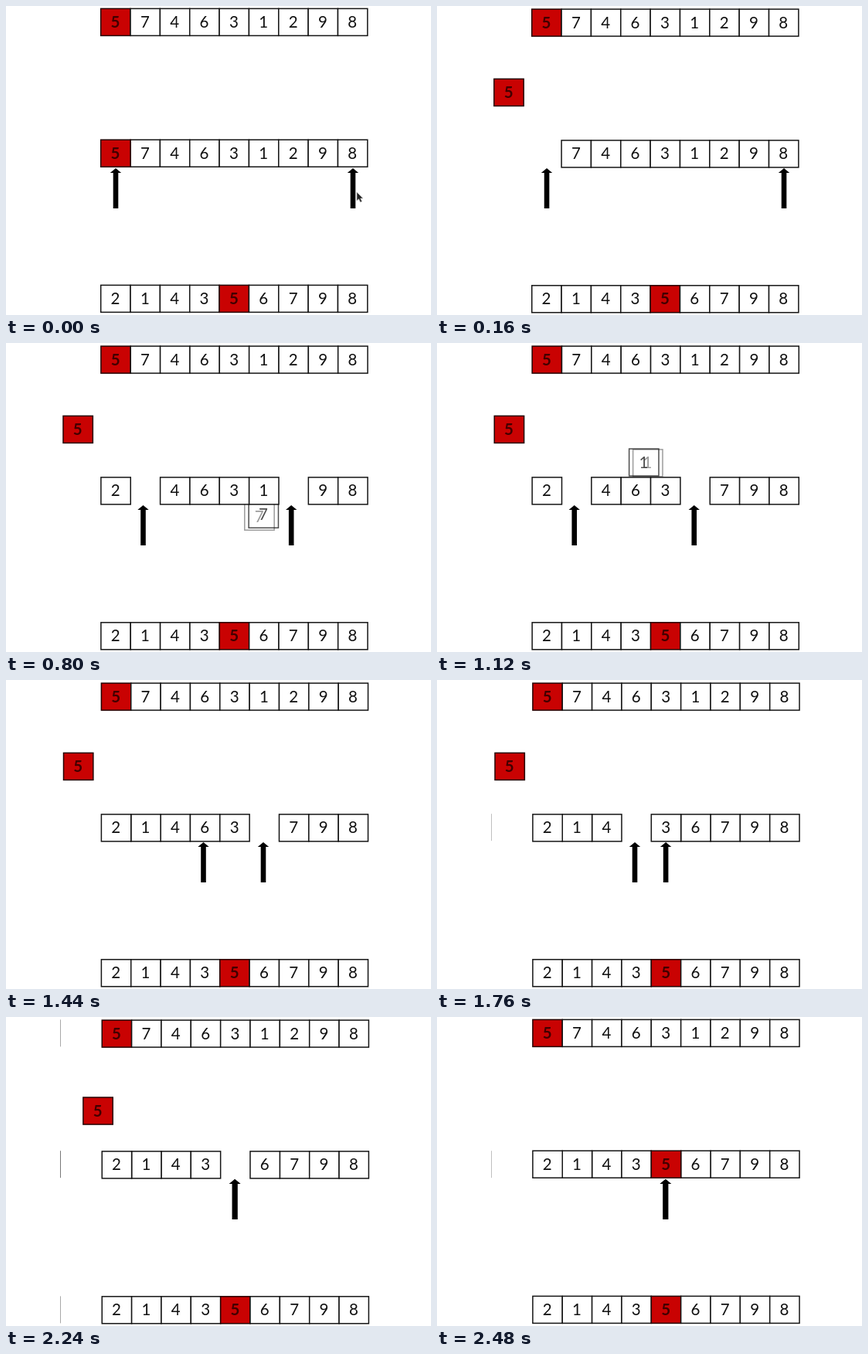
Recreate the animation shown at these times as an HTML page. Size 550x400 px, loop 2560 ms.

```html
<!DOCTYPE html>
<html lang="en">
<head>
<meta charset="utf-8">
<title>Partition around a pivot</title>
<style>
html, body { margin: 0; width: 100%; height: 100%; overflow: hidden; background: #fff; }
svg { display: block; width: 550px; height: 400px; }
text { font: 20.5px Lato, Carlito, sans-serif; text-anchor: middle; fill: #111; }
.pivot text { font-weight: 700; fill: #420000; }
rect { fill: #fff; stroke: #141414; stroke-width: 1.5; }
.pivot rect { fill: #c90202; stroke: #240000; }
.ghost rect { fill: none; }
</style>
</head>
<body>
<svg id="stage" viewBox="0 0 550 400"></svg>
<script>
const LOOP = 2560, STEP = 80;
const X0 = 122.7, W = 38.35, H = 35;
const TOP = 3.4, MID = 173.2, LOW = 361.4;
const PIVOT = 5, HOME = { x: 73.8, y: 94.4 }, PIVOT_END = 4;
const START = [5, 7, 4, 6, 3, 1, 2, 9, 8];
const SORTED = [2, 1, 4, 3, 5, 6, 7, 9, 8];

// All times below are counted in steps.
const moves = [
  { n: 2, from: 6, to: 0, t: 4, end: 5.62 },
  { n: 7, from: 1, to: 6, t: 8.6, end: 10.57 },
  { n: 1, from: 5, to: 1, t: 13, end: 15.2 },
  { n: 6, from: 3, to: 5, t: 18.3, end: 20.6 },
  { n: 3, from: 4, to: 3, t: 22.4, end: 24.6 }
];
const leftArrow = [[6, 142], [8, 177.3], [15.5, 177.3], [16.5, 216], [17, 216],
                   [18, 254.8], [26.2, 254.8], [27.6, 294.3]];
const rightArrow = [[2, 449], [3, 409], [4, 369], [11, 369], [12.5, 332.3],
                    [20.6, 332.3], [22, 294.9]];
const drift = [[0, 0], [10, 0.2], [18, 0.7], [22, 1.2], [26, 1.8], [31, 1.2]];

const stage = document.getElementById("stage");
const clamp = v => Math.max(0, Math.min(1, v));
const lerp = (a, b, p) => a + (b - a) * p;
const smooth = u => u * u * (3 - 2 * u);
const colX = c => X0 + c * W;

function track(keys, t) {
  if (t <= keys[0][0]) return keys[0][1];
  for (let i = 1; i < keys.length; i++) {
    const [a, v] = keys[i - 1], [b, w] = keys[i];
    if (t < b) return lerp(v, w, (t - a) / (b - a));
  }
  return keys[keys.length - 1][1];
}

function cell(n, x, y, alpha = 1) {
  const kind = n === PIVOT ? "pivot" : alpha < 1 ? "ghost" : "";
  return `<g class="${kind}" opacity="${alpha}" transform="translate(${x.toFixed(2)} ${y.toFixed(2)})">` +
    `<rect width="${W}" height="${H}"/><text x="${W / 2 - 0.4}" y="24.6">${n}</text></g>`;
}

const row = (digits, y) => digits.map((n, i) => cell(n, colX(i), y)).join("");

function arrow(x) {
  return `<path transform="translate(${x.toFixed(2)} 210)" d="M0 0L7.2 6H3.3V52H-3.3V6H-7.2Z"/>`;
}

function flight(m, u, y) {
  const p = smooth(clamp(u)), a = colX(m.from), b = colX(m.to);
  const height = Math.max(20, 0.245 * Math.abs(b - a));
  return [lerp(a, b, p), y + Math.sign(b - a) * height * 4 * p * (1 - p)];
}

function pivotCell(t, y) {
  const out = smooth(clamp((t - 0.2) / 1.7));
  const back = smooth(clamp((t - 27.5) / 2.3));
  const end = back > 0 ? colX(PIVOT_END) : colX(0);
  const away = back > 0 ? 1 - back : out;
  return cell(PIVOT, lerp(end, HOME.x, away), lerp(y, HOME.y, away));
}

function middle(t, y) {
  let flying = "", still = "";
  START.forEach((n, i) => {
    if (n === PIVOT) return;
    const m = moves.find(k => k.n === n);
    const u = m ? (t - m.t) / (m.end - m.t) : 0;
    if (u > 0 && u < 1) {
      flying += cell(n, ...flight(m, u - 0.022, y), 0.42) + cell(n, ...flight(m, u, y), 0.75);
    } else {
      still += cell(n, colX(u >= 1 ? m.to : i), y);
    }
  });
  return flying + still + pivotCell(t, y);
}

function edge(y, alpha) {
  return alpha > 0 ? `<path d="M70.5 ${y}v${H}" stroke="#333" opacity="${alpha.toFixed(2)}"/>` : "";
}

const cursor = '<path d="M454 241V252L456.6 249.8L458.6 254L460.6 253L458.7 249H462Z" ' +
  'fill="#222" stroke="#bbb" stroke-width=".7"/>';

function draw(t) {
  const d = track(drift, t), dy = t < 1 || t >= 30 ? 0 : 0.7;
  const outer = clamp((d - 1.3) / 0.5) * 0.8;
  const inner = clamp((d - 0.9) / 0.9) * 0.9;
  stage.innerHTML =
    edge(TOP, outer) + edge(MID, inner) + edge(LOW, outer) +
    `<g transform="translate(${d.toFixed(2)} 0)">` +
    row(START, TOP + dy) + middle(t, MID + dy) + row(SORTED, LOW + dy * 0.6) +
    arrow(track(leftArrow, t)) + arrow(track(rightArrow, t)) + "</g>" +
    (t < 1 ? cursor : "");
}

let shown = -1;
function tick() {
  const step = Math.floor(performance.now() % LOOP / STEP);
  if (step !== shown) draw(shown = step);
  requestAnimationFrame(tick);
}
tick();
</script>
</body>
</html>
```
